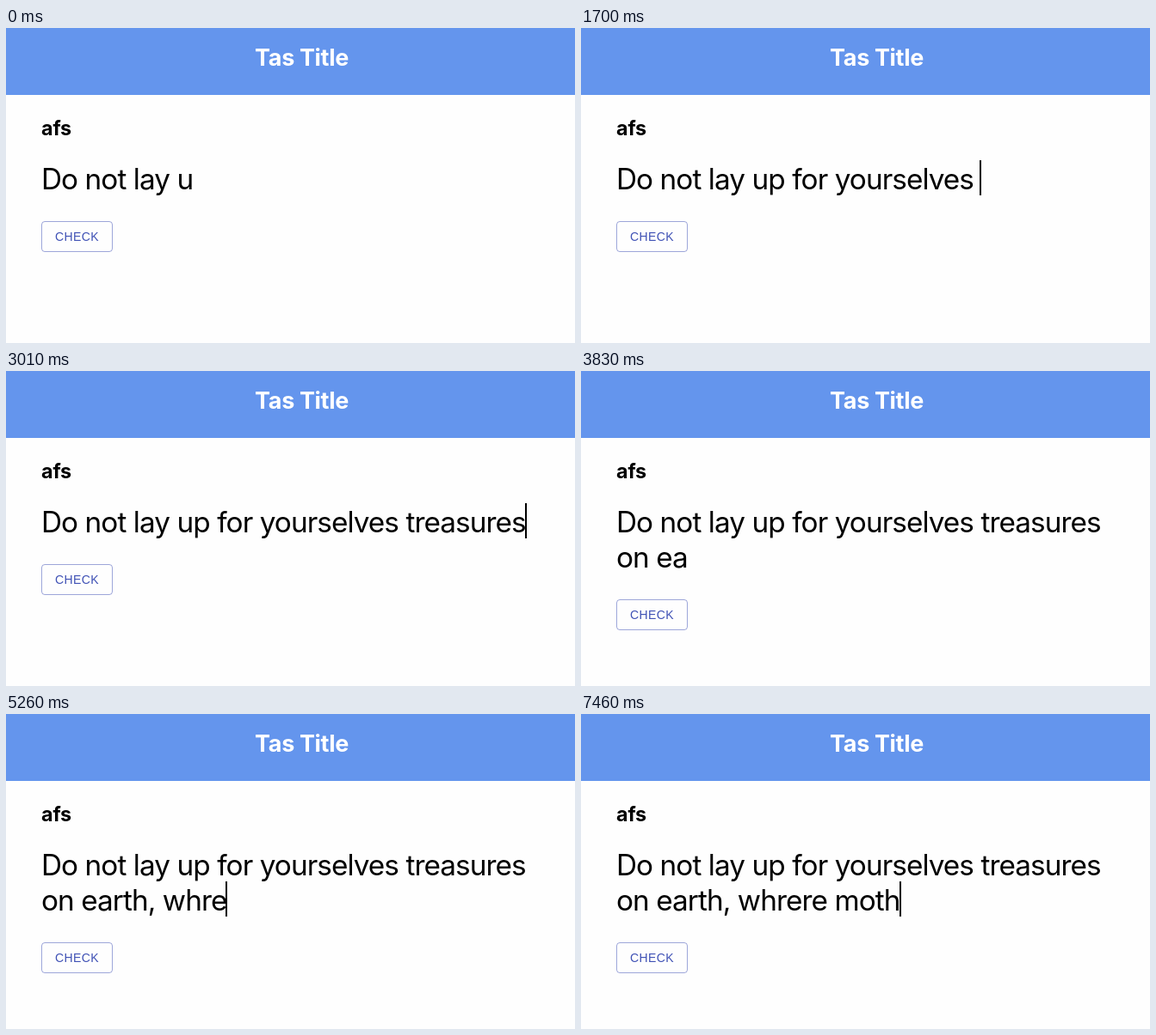
Animation, 661 px wide and 367 px high, one loop 8 s. Source, as an HTML page:

```html
<!DOCTYPE html>
<html lang="en">
<head>
<meta charset="utf-8">
<title>Typing practice</title>
<style>
  html, body { margin: 0; width: 100%; height: 100%; overflow: hidden; background: #fefefe; }
  svg { display: block; }
  text { font-family: Inter, "Open Sans", sans-serif; font-optical-sizing: none; white-space: pre; }
  .title { font-size: 27px; font-weight: 700; letter-spacing: -.35px; fill: #fff; text-anchor: middle; }
  .name { font-size: 23.4px; font-weight: 700; letter-spacing: -.2px; }
  .line { font-size: 33.3px; letter-spacing: -.92px; }
  .label { font: 14px "Liberation Sans", Arial, sans-serif; letter-spacing: .4px; fill: #3f51b5; }
  .frame { fill: none; stroke: #3f51b5; stroke-opacity: .5; }
</style>
</head>
<body>
<svg width="661" height="367" viewBox="0 0 661 367">
  <rect width="661" height="78" fill="#6495ed"/>
  <text class="title" x="343.5" y="44">Tas Title</text>
  <text class="name" x="41" y="125">afs</text>
  <text class="line" x="41" y="188"></text>
  <text class="line" x="41" y="229"></text>
  <rect id="caret" y="154" width="2" height="41"/>
  <g id="button">
    <rect class="frame" x="41.5" y="225.5" width="82" height="35" rx="3.5"/>
    <text class="label" x="57" y="248">CHECK</text>
  </g>
</svg>
<script>
const LOOP = 8000;
const LEFT = 41;
const LINE_HEIGHT = 41;
const MAX_CHARS = 40;
const START = "Do not lay u";

// When each keystroke shows up, in ms
const KEYS = [
  [120, "p"], [300, " "], [360, "f"], [480, "o"], [540, "r"], [660, " "],
  [760, "yo"], [880, "u"], [940, "r"], [1060, "s"], [1120, "e"],
  [1300, "l"], [1360, "v"], [1420, "e"], [1530, "s"], [1700, " "],
  [1880, "t"], [2060, "r"], [2120, "e"], [2240, "a"], [2660, "s"],
  [2720, "u"], [2840, "r"], [2900, "e"], [3010, "s"], [3130, " "],
  [3190, "o"], [3310, "n"], [3540, " e"], [3720, "a"], [3840, "r"],
  [3960, "t"], [4070, "h"], [4430, ","], [4600, " w"], [4780, "h"],
  [5080, "r"], [5260, "e"], [5610, "r"], [5670, "e"], [6630, " "],
  [7220, "mo"], [7400, "t"], [7460, "h"]
];

// The caret is off at first and flips at each of these times
const BLINKS = [300, 760, 1420, 2060, 2600, 3190, 3840, 4430, 5020, 5610, 6210, 6810, 7460];

const lines = document.querySelectorAll(".line");
const caret = document.getElementById("caret");
const button = document.getElementById("button");

function textAt(t) {
  return START + KEYS.filter(([at]) => at <= t).map(([, key]) => key).join("");
}

function wrap(text) {
  if (text.length <= MAX_CHARS) return [text, ""];
  const cut = text.lastIndexOf(" ", MAX_CHARS);
  return [text.slice(0, cut), text.slice(cut + 1)];
}

function setText(node, value) {
  if (node.textContent !== value) node.textContent = value;
}

function render(t) {
  const parts = wrap(textAt(t));
  lines.forEach((line, i) => setText(line, parts[i]));

  const row = parts[1] ? 1 : 0;
  const shift = `translate(0 ${row * LINE_HEIGHT})`;
  button.setAttribute("transform", shift);
  caret.setAttribute("transform", shift);
  caret.setAttribute("x", Math.round(LEFT + lines[row].getComputedTextLength()) - 1);

  const flips = BLINKS.filter(at => at <= t).length;
  caret.setAttribute("visibility", flips % 2 ? "visible" : "hidden");
}

const began = performance.now();
function tick() {
  render((performance.now() - began) % LOOP);
  requestAnimationFrame(tick);
}
tick();
</script>
</body>
</html>
```
